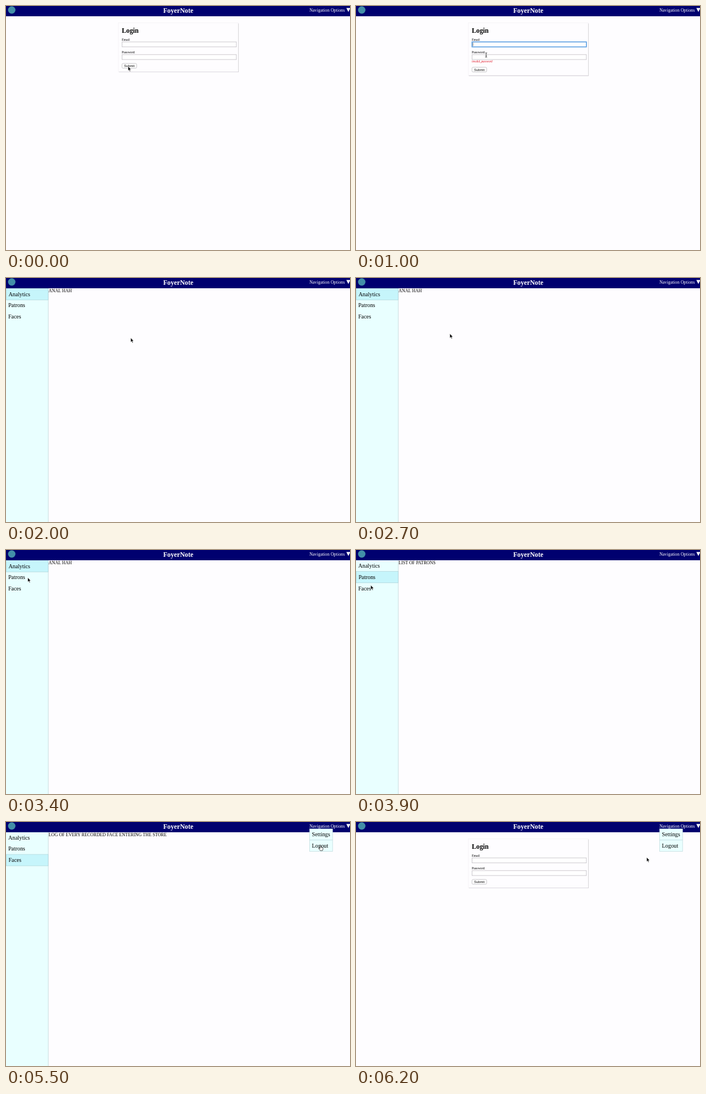
These frames come from a looping animation (600 by 428 pixels, 6300 ms). An HTML page:

```html
<!DOCTYPE html>
<html lang="en">
<head>
<meta charset="utf-8">
<title>Login demo</title>
<style>
  html, body { margin: 0; width: 100%; height: 100%; overflow: hidden; background: #fefdff; }
  svg { display: block; width: 600px; height: 428px; font-family: "Liberation Serif", "Times New Roman", serif; }
  .sans { font-family: "Liberation Sans", Arial, sans-serif; }
  .field { fill: #fff; stroke: #c6c4c8; stroke-width: .9; }
  .field.on { stroke: #5b9fe2; stroke-width: 1.6; }
  .error { fill: #e01020; font-size: 5.05px; font-style: italic; }
  .label { font-size: 5.85px; }
  .value { font-size: 5.4px; }
  .item { font-size: 9.85px; }
  .panel { fill: #e9ffff; }
</style>
</head>
<body>
<svg viewBox="0 0 600 428">
  <rect width="600" height="428" fill="#fefdff"/>

  <g id="login">
    <g id="card">
      <rect id="shade" x="196.8" y="30.6" width="209" fill="#c9c7cb"/>
      <rect id="paper" x="196" y="29.7" width="209" fill="#fefdff" stroke="#eeecef" stroke-width=".5"/>
    </g>
    <text x="202" y="47" font-size="11.7" font-weight="bold">Login</text>
    <text class="label" x="202" y="61">Email</text>
    <rect id="emailBox" class="field" x="202.4" y="63" width="199.4" height="8.7"/>
    <text id="email" class="sans value" x="204" y="69.3"></text>
    <text id="emailError" class="error" x="202" y="77">invalid_email</text>
    <g id="lower">
      <text class="label" x="202" y="83.2">Password</text>
      <rect id="passBox" class="field" x="202.4" y="85.2" width="199.4" height="8.7"/>
      <text id="pass" class="sans value" x="204" y="91.5"></text>
      <text id="passError" class="error" x="202" y="99">invalid_password</text>
    </g>
    <rect id="caret" width=".6" height="6" fill="#222"/>
    <g id="button">
      <rect x="202.3" y="100.8" width="25.6" height="8.4" rx="2" fill="#fff" stroke="#bdbbbf" stroke-width=".8"/>
      <text class="sans" x="215.1" y="107" font-size="5.8" text-anchor="middle">Submit</text>
    </g>
  </g>

  <g id="board">
    <rect class="panel" y="18" width="74" height="410"/>
    <path d="M73.8 18V428" stroke="#c3d6d8" stroke-width=".8"/>
    <rect id="mark" x=".3" width="73.4" fill="#c6f5fb" stroke="#aed2d7" stroke-width=".7"/>
    <g id="side" class="item"></g>
    <text id="content" x="74.3" y="25.2" font-size="7.85"></text>
  </g>

  <rect width="600" height="18" fill="#00006f"/>
  <circle cx="10" cy="7" r="6.5" fill="#438fa8"/>
  <text x="300.5" y="12.3" font-size="11.7" font-weight="bold" fill="#fff" text-anchor="middle">FoyerNote</text>
  <text x="529.2" y="9.8" font-size="7.88" fill="#fff">Navigation Options</text>
  <path d="M593.6 3.4H600.6L597.1 10.6Z" fill="#fff"/>

  <g id="menu" class="item">
    <rect class="panel" x="529.6" y="12" width="40.2" height="39.4" stroke="#bcd9dc" stroke-width=".7"/>
    <path d="M529.6 31.6H569.8" stroke="#bcd9dc" stroke-width=".8"/>
    <text x="533.6" y="25.2">Settings</text>
    <text x="533.6" y="45">Logout</text>
  </g>

  <g id="pointer">
    <path id="arrow" d="M0 0V7.4L1.7 5.9L2.9 8.7L4.1 8.2L2.9 5.5H5.2Z" fill="#000" stroke="#fff" stroke-width=".5"/>
    <path id="beam" d="M-1.6-4Q0-4 0-3Q0-4 1.6-4M0-3V3M-1.6 4Q0 4 0 3Q0 4 1.6 4M-.8 1.4H.8" fill="none" stroke="#222" stroke-width=".8"/>
    <path id="hand" d="M-.8.3Q0-.5.7.3V3Q1.6 2.6 2.2 3.2Q3 2.9 3.4 3.6Q4.4 3.5 4.4 4.5V6.2L3.5 8.6H-.5L-2.8 5.4Q-2.9 4.2-1.6 4.5L-.8 5.2Z" fill="#fff" stroke="#111" stroke-width=".7"/>
  </g>
</svg>
<script>
const LOOP = 6300, STEP = 100;
const EMAIL = "demo@example.com";
const ITEMS = ["Analytics", "Patrons", "Faces"];
const CONTENT = ["ANAL HAH", "LIST OF PATRONS", "LOG OF EVERY RECORDED FACE ENTERING THE STORE"];

// time, x, y of the pointer
const PATH = [
  [0, 213, 106], [300, 213, 107], [500, 226, 68], [600, 222, 90], [700, 215, 111],
  [800, 215, 111], [1000, 227, 86], [1400, 227, 87], [1700, 218, 105], [2000, 217.5, 105],
  [2400, 205, 130], [2800, 150, 87], [3200, 58, 58], [3400, 38, 48.5], [3600, 37, 49],
  [4000, 22, 66], [4200, 22, 66], [4400, 260, 30], [4600, 565, 9.2], [4900, 556, 22],
  [5300, 548.5, 41.5], [5600, 548.5, 41.5], [5900, 515, 97], [6200, 507, 62]
];

const $ = id => document.getElementById(id);
const set = (id, attrs) => { for (const k in attrs) $(id).setAttribute(k, attrs[k]); };
const show = (id, on) => set(id, { visibility: on ? "inherit" : "hidden" });
const within = (t, a, b) => t >= a && t < b;
const typed = (t, start, end, n) =>
  Math.round(n * Math.min(1, Math.max(0, (t - start) / (end - start))));

const rows = ITEMS.map(name => {
  const row = document.createElementNS("http://www.w3.org/2000/svg", "text");
  row.textContent = name;
  $("side").append(row);
  return row;
});

function pointerAt(t) {
  const i = PATH.findIndex(p => p[0] >= t);
  if (i <= 0) return PATH[0].slice(1);
  const a = PATH[i - 1], b = PATH[i], k = (t - a[0]) / (b[0] - a[0]);
  return [a[1] + (b[1] - a[1]) * k, a[2] + (b[2] - a[2]) * k];
}

function drawLogin(t) {
  const badEmail = within(t, 200, 700), badPass = within(t, 200, 1900);
  const focus = within(t, 700, 1400) ? "email" : within(t, 1400, 1800) ? "pass" : "";
  const drop = badEmail ? 6.6 : 0, total = drop + (badPass ? 6.6 : 0);
  show("emailError", badEmail);
  show("passError", badPass);
  set("lower", { transform: `translate(0 ${drop})` });
  set("button", { transform: `translate(0 ${total})` });
  set("paper", { height: 85.5 + total });
  set("shade", { height: 85.5 + total });
  for (const id of ["email", "pass"]) set(id + "Box", { class: id === focus ? "field on" : "field" });

  const filling = within(t, 1000, 1900);
  $("email").textContent = filling ? EMAIL.slice(0, typed(t, 1000, 1300, EMAIL.length)) : "";
  $("pass").textContent = filling ? "•".repeat(typed(t, 1400, 1700, 8)) : "";
  show("caret", focus);
  if (focus) {
    const field = $(focus);
    const end = field.textContent ? field.getComputedTextLength() : 0;
    set("caret", { x: 203.7 + end, y: focus === "email" ? 64.3 : 86.5 + drop });
  }
}

function drawBoard(t) {
  const current = t < 3500 ? 0 : t < 4200 ? 1 : 2;
  let y = 18;
  rows.forEach((row, i) => {
    const on = i === current, h = on ? 20.3 : 19.3;
    row.setAttribute("x", on ? 4.4 : 3.9);
    row.setAttribute("y", y + (on ? 13.5 : 12.9));
    if (on) set("mark", { y: y + .3, height: h - .3 });
    y += h;
  });
  $("content").textContent = CONTENT[current];
}

function drawPointer(t) {
  const [x, y] = pointerAt(t);
  const beam = within(t, 400, 700) || within(t, 900, 1600);
  const hand = within(t, 4600, 5600);
  set("pointer", { transform: `translate(${x} ${y})` });
  show("beam", beam);
  show("hand", hand);
  show("arrow", !beam && !hand);
}

function frame(now) {
  const t = Math.floor(now % LOOP / STEP) * STEP;
  const inside = within(t, 1900, 5600);
  show("login", !inside);
  show("board", inside);
  show("menu", t >= 4500);
  drawLogin(t);
  drawBoard(t);
  drawPointer(t);
  requestAnimationFrame(frame);
}
frame(performance.now());
</script>
</body>
</html>
```
